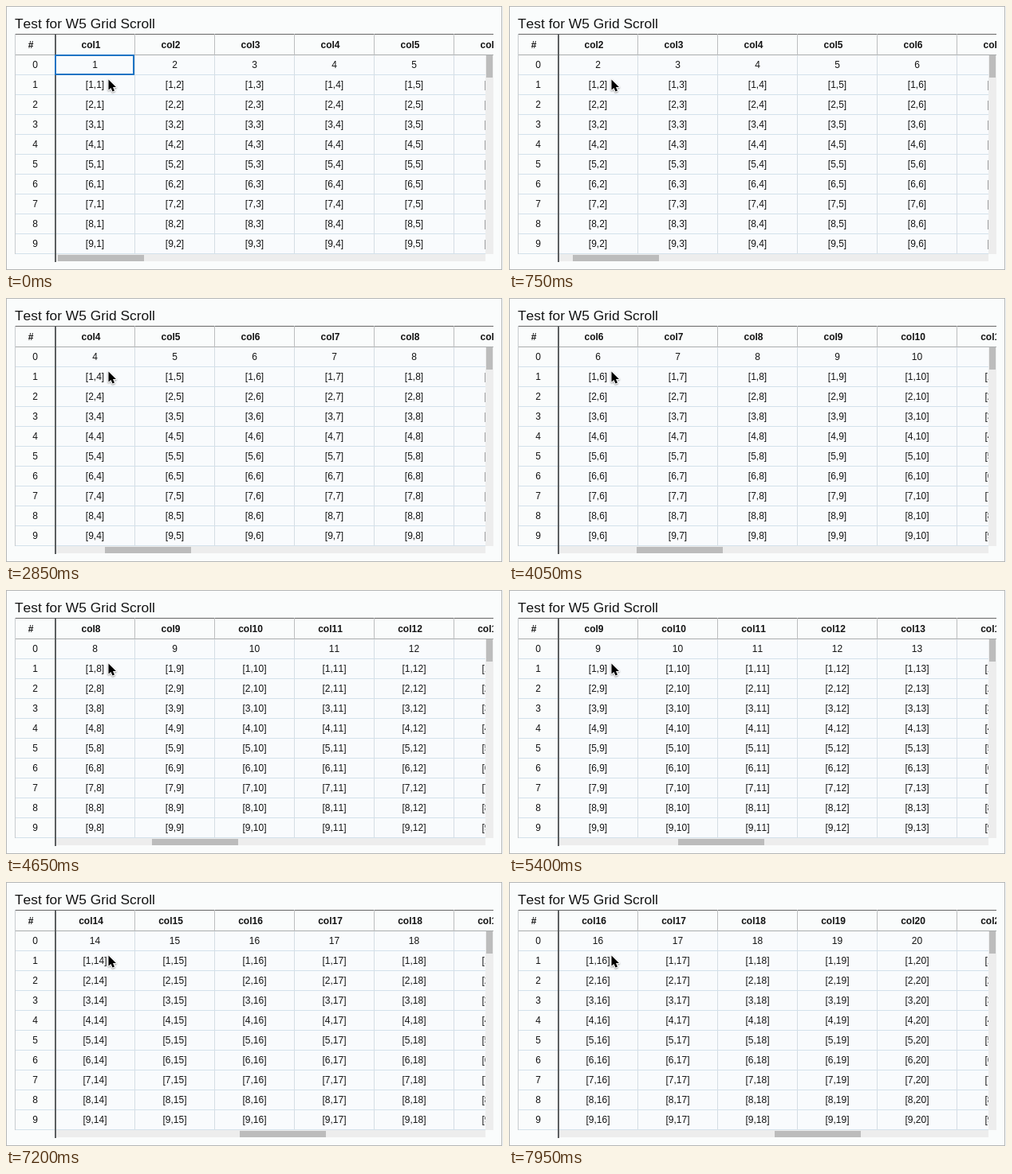
Recreate the animation shown at these times as an HTML page with a canvas. Size 623 by 332 pixels, loop 8000 ms.

```html
<!DOCTYPE html>
<html lang="en">
<head>
<meta charset="utf-8">
<title>Grid scroll</title>
<style>
  html, body { margin: 0; width: 100%; height: 100%; overflow: hidden; background: #fafcfc; }
  canvas { display: block; width: 623px; height: 332px; }
</style>
</head>
<body>
<canvas id="stage" width="623" height="332"></canvas>
<script>
const ctx = document.getElementById('stage').getContext('2d', { alpha: false });
const FONT = '"Liberation Sans", Arial, sans-serif';
const INK = '#141414';
const LOOP = 8000, STEP = 150;
const LEFT = 11, GRID = 62, TOP = 35, BODY = 62, RIGHT = 611, BAR = 601;
const COL = 100, ROW = 25, ROWS = 10, COLS = 6, HEIGHT = ROW * ROWS;
const TRACK = 65, THUMB = 108, THUMB_PER_COL = 17.87;

// Scroll thumb key points: [ms, x]
const KEYS = [[150, 72], [1350, 87], [2850, 124], [4050, 160],
              [4650, 183], [6300, 246], [7950, 333]];

function thumbAt(t) {
  if (t < STEP) return TRACK;
  const i = Math.max(1, KEYS.findIndex(key => t <= key[0]));
  const [t0, x0] = KEYS[i - 1], [t1, x1] = KEYS[i];
  return Math.round(x0 + (x1 - x0) * (t - t0) / (t1 - t0));
}

function box(x, y, w, h, color) {
  ctx.fillStyle = color;
  ctx.fillRect(x, y, w, h);
}

function text(str, x, y, font, align = 'center') {
  ctx.font = font + ' ' + FONT;
  ctx.fontKerning = 'none';
  ctx.fillStyle = INK;
  ctx.textAlign = align;
  ctx.fillText(str, x, y);
}

function clipped(x, y, w, h, paint) {
  ctx.save();
  ctx.beginPath();
  ctx.rect(x, y, w, h);
  ctx.clip();
  paint();
  ctx.restore();
}

function drawHeader(first) {
  clipped(LEFT, TOP, RIGHT - LEFT, 27, () => {
    box(LEFT, TOP, RIGHT - LEFT, 1, '#666');
    box(LEFT, 61, RIGHT - LEFT, 1, '#aaadae');
    text('#', 31, 53, 'bold 12px');
    for (let i = 0; i < COLS; i++) {
      const x = GRID + i * COL;
      text('col' + (first + i), x + 44.5, 53, 'bold 12px');
      box(x + 99, TOP, 1, 27, '#bbbdbe');
    }
  });
}

function drawBody(first) {
  clipped(LEFT, BODY, BAR - LEFT, HEIGHT, () => {
    box(GRID, BODY, BAR - GRID, HEIGHT, '#f9fbfd');
    for (let i = 0; i < COLS; i++) box(GRID + i * COL + 99, BODY, 1, HEIGHT, '#d5dde4');
    for (let r = 0; r < ROWS; r++) {
      const y = BODY + r * ROW;
      box(LEFT, y + 24, BAR - LEFT, 1, '#d3e1eb');
      text(r, 36.5, y + 16, '12px');
      for (let i = 0; i < COLS; i++) {
        const c = first + i;
        text(r ? `[${r},${c}]` : c, GRID + i * COL + 49.5, y + 16, '12px');
      }
    }
  });
}

function drawScrollbars(x) {
  box(BAR, BODY, 10, HEIGHT, '#ededed');
  box(BAR + 1, BODY, 8, 28, '#bcbcbc');
  box(GRID, 312, BAR - GRID, 9, '#ededed');
  box(x, 313, THUMB, 8, '#bcbcbc');
}

function drawCursor() {
  ctx.save();
  ctx.beginPath();
  [[128.5, 92.5], [128.5, 105.5], [131.5, 103], [133.5, 107.5], [136, 106.5],
   [134, 102], [138, 102]].forEach(([x, y]) => ctx.lineTo(x, y));
  ctx.closePath();
  ctx.lineJoin = 'round';
  ctx.lineWidth = 2;
  ctx.strokeStyle = '#fff';
  ctx.shadowColor = 'rgba(0, 0, 0, 0.4)';
  ctx.shadowBlur = 2;
  ctx.shadowOffsetY = 1;
  ctx.stroke();
  ctx.shadowColor = 'transparent';
  ctx.fillStyle = '#000';
  ctx.fill();
  ctx.restore();
}

function draw(t) {
  const x = thumbAt(t);
  const scrolled = t >= STEP;
  const index = Math.floor((x - TRACK) / THUMB_PER_COL + 0.41);
  const first = 1 + (scrolled ? Math.max(1, index) : 0);

  box(0, 0, 623, 332, '#fafcfc');
  ctx.lineWidth = 1;
  ctx.strokeStyle = '#b4b6b6';
  ctx.strokeRect(0.5, 0.5, 621, 331);
  text('Test for W5 Grid Scroll', LEFT, 28, '17.4px', 'left');

  drawHeader(first);
  drawBody(first);
  box(LEFT, TOP, 1, 277, '#c9cdd0');
  drawScrollbars(x);
  box(61, TOP, 2, 287, '#5c5f61');

  if (!scrolled) {
    ctx.lineWidth = 2;
    ctx.strokeStyle = '#1f74c4';
    ctx.strokeRect(62, 62, 98, 24);
  }
  drawCursor();
}

function tick() {
  const t = performance.now() % LOOP;
  draw(Math.floor(t / STEP) * STEP);
  requestAnimationFrame(tick);
}
tick();
</script>
</body>
</html>
```
